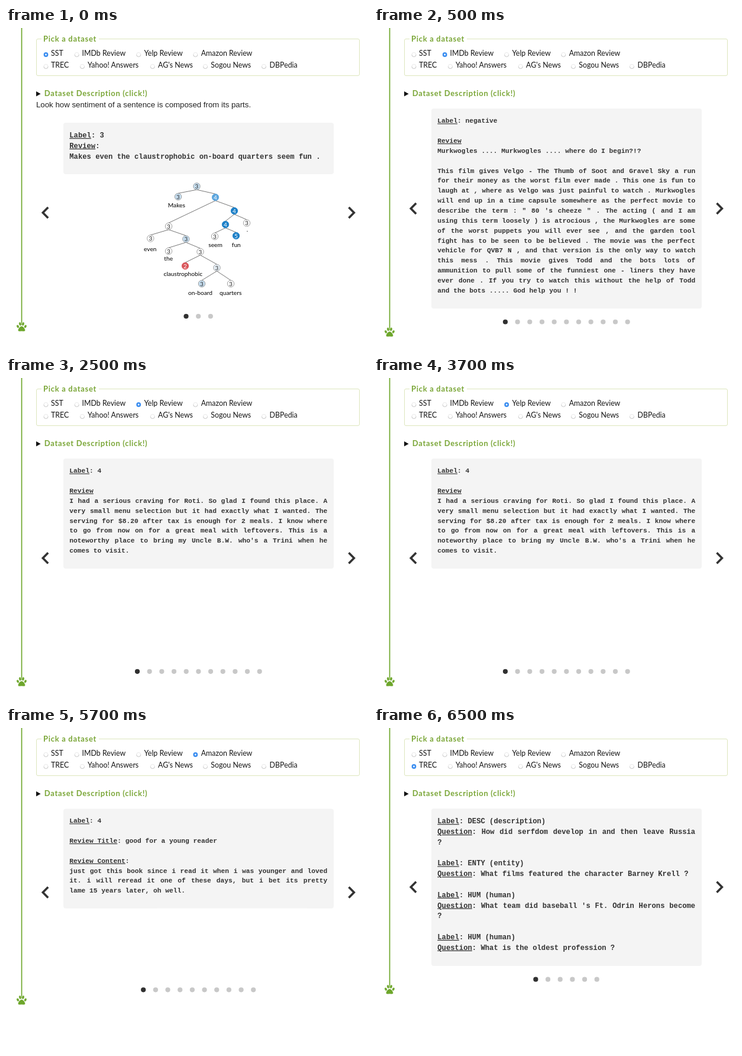
Recreate the animation shown at these times as an HTML page. Size 612 px wide and 544 px high, loop 8000 ms.

```html
<!DOCTYPE html>
<html lang="en">
<head>
<meta charset="utf-8">
<title>Dataset picker</title>
<style>
  html, body { margin: 0; width: 100%; height: 100%; overflow: hidden; background: #fff; }
  svg { display: block; width: 612px; height: 544px; }
  .label { font: 12.4px Lato, sans-serif; fill: #161616; }
  .head { font: bold 13px Lato, sans-serif; letter-spacing: .7px; fill: #7aa637; }
  .intro { font: 13.25px "Liberation Sans", Arial, sans-serif; fill: #222; }
  .mono { font-family: "Liberation Mono", Courier, monospace; font-weight: bold; fill: #333; }
  .mono .u { text-decoration: underline 1px; text-underline-offset: 2px; }
  .leaf { font: 10.2px Lato, sans-serif; fill: #000; text-anchor: middle; }
  .score { font: 10px Lato, sans-serif; text-anchor: middle; }
</style>
</head>
<body>
<svg id="stage" viewBox="0 0 612 544" xmlns="http://www.w3.org/2000/svg"></svg>
<script>
const LOOP = 8000;
const LEFT = 107.3, WIDTH = 436.3;
const GREEN = '#6da62b';

// text, radio x, label x, row
const options = [
  ['SST', 67.5, 76, 0], ['IMDb Review', 119.7, 128.5, 0],
  ['Yelp Review', 224.2, 233.5, 0], ['Amazon Review', 320.3, 329.7, 0],
  ['TREC', 67.5, 76, 1], ['Yahoo! Answers', 129, 138, 1],
  ["AG's News", 247.8, 257, 1], ['Sogou News', 337, 346.3, 1],
  ['DBPedia', 436, 445.6, 1]
];

const small = { size: 11.26, step: 16.86, base: 160.3 };
const large = { size: 12.2, step: 17.8, base: 161.2 };

const scenes = [
  { at: 0, pick: 0, top: 160, bottom: 247, arrow: 312, dotY: 487, dotX: 304.5, dots: 3, paw: 505,
    type: { ...large, base: 185 }, tree: true,
    text: `_Label_: 3
_Review_:
Makes even the claustrophobic on-board quarters seem fun .` },
  { at: 500, pick: 1, top: 136, bottom: 474, arrow: 305, dotY: 496.5, dotX: 222, dots: 11, paw: 514,
    type: small,
    text: `_Label_: negative

_Review_
Murkwogles .... Murkwogles .... where do I begin?!?

This film gives Velgo - The Thumb of Soot and Gravel Sky a run for their money as the worst film ever made . This one is fun to laugh at , where as Velgo was just painful to watch . Murkwogles will end up in a time capsule somewhere as the perfect movie to describe the term : " 80 's cheeze " . The acting ( and I am using this term loosely ) is atrocious , the Murkwogles are some of the worst puppets you will ever see , and the garden tool fight has to be seen to be believed . The movie was the perfect vehicle for QVB7 N , and that version is the only way to watch this mess . This movie gives Todd and the bots lots of ammunition to pull some of the funniest one - liners they have ever done . If you try to watch this without the help of Todd and the bots ..... God help you ! !` },
  { at: 2500, pick: 2, top: 136, bottom: 322, arrow: 304.3, dotY: 495.8, dotX: 222, dots: 11, paw: 513.3,
    type: small,
    text: `_Label_: 4

_Review_
I had a serious craving for Roti. So glad I found this place. A very small menu selection but it had exactly what I wanted. The serving for $8.20 after tax is enough for 2 meals. I know where to go from now on for a great meal with leftovers. This is a noteworthy place to bring my Uncle B.W. who's a Trini when he comes to visit.` },
  { at: 4500, pick: 3, top: 136.5, bottom: 304.7, arrow: 277.7, dotY: 442.3, dotX: 232.2, dots: 10, paw: 460,
    type: small,
    text: `_Label_: 4

_Review Title_: good for a young reader

_Review Content_:
just got this book since i read it when i was younger and loved it. i will reread it one of these days, but i bet its pretty lame 15 years later, oh well.` },
  { at: 6500, pick: 4, top: 136, bottom: 402, arrow: 268.7, dotY: 424.7, dotX: 273.4, dots: 6, paw: 442,
    type: large,
    text: `_Label_: DESC (description)
_Question_: How did serfdom develop in and then leave Russia ?

_Label_: ENTY (entity)
_Question_: What films featured the character Barney Krell ?

_Label_: HUM (human)
_Question_: What team did baseball 's Ft. Odrin Herons become ?

_Label_: HUM (human)
_Question_: What is the oldest profession ?` }
];

// x, y, score, tone, parent, leaf text, leaf x, leaf y
const nodes = [
  [322.5, 267.5, 3, 'pale', -1],
  [291, 285, 3, 'pale', 0, 'Makes', 288.3, 303],
  [354, 286, 4, 'mid', 0],
  [386, 309, 4, 'deep', 2],
  [371, 332, 4, 'deep', 3],
  [407, 329.5, 3, 'none', 3, '.', 408, 343.5],
  [275, 335, 3, 'none', 2],
  [244.3, 355.5, 3, 'none', 6, 'even', 243.8, 376.5],
  [304.3, 356.5, 3, 'pale', 6],
  [353, 352, 3, 'none', 4, 'seem', 354, 370],
  [389, 351, 5, 'deep', 4, 'fun', 389.3, 369.5],
  [275, 377, 3, 'none', 8, 'the', 274.7, 393],
  [328.5, 378, 3, 'none', 8],
  [303, 402, 2, 'red', 12, 'claustrophobic', 299.3, 419],
  [356.5, 405, 3, 'faint', 12],
  [331, 432, 3, 'pale', 14, 'on-board', 328.5, 451],
  [380, 432, 3, 'none', 14, 'quarters', 379.7, 451]
];
const tones = { none: '#fff', faint: '#eaf3fb', pale: '#c9e1f3', mid: '#5ba5dd', deep: '#1c7fc7', red: '#d9555a' };
const RADIUS = 5.7;

const text = (cls, x, y, s) => `<text class="${cls}" x="${x}" y="${y}">${s}</text>`;
const circle = (x, y, r, attrs) => `<circle cx="${x}" cy="${y}" r="${r}" ${attrs}/>`;

function radio(x, y, on) {
  if (on) return circle(x, y, 3.9, 'fill="#3a8df0"') + circle(x, y, 1.4, 'fill="#fff"');
  return circle(x, y, 3.6, 'fill="#fff" stroke="#e2e2e2" stroke-width=".8"') +
    `<path d="M${x - 3.6} ${y}a3.6 3.6 0 0 0 7.2 0" fill="none" stroke="#c6c6c6" stroke-width=".8"/>`;
}

function picker(pick) {
  const rows = options.map(([name, rx, x, row], i) =>
    radio(rx, 45 + row * 20, i === pick) + text('label', x, 47 + row * 19.6, name));
  return `<path d="M60 18.5H54a2.5 2.5 0 0 0-2.5 2.5V78a2.5 2.5 0 0 0 2.5 2.5H595a2.5 2.5 0 0 0 2.5-2.5V21a2.5 2.5 0 0 0-2.5-2.5H157"
    fill="none" stroke="#dde6bd"/>` + text('head', 63, 22.5, 'Pick a dataset') + rows.join('');
}

function wrap(par, max) {
  const lines = [''];
  for (const word of par.split(' ')) {
    const last = lines[lines.length - 1];
    const next = last ? last + ' ' + word : word;
    if (next.replace(/_/g, '').length > max) lines.push(word);
    else lines[lines.length - 1] = next;
  }
  return lines;
}

// Wrapped, justified monospace copy
function copy(source, { size, step, base }) {
  const cell = size * 0.6001;
  let y = base, out = '';
  for (const par of source.split('\n')) {
    const lines = wrap(par, Math.floor(WIDTH / cell));
    lines.forEach((line, i) => {
      const plain = line.replace(/_/g, '');
      const gaps = plain.split(' ').length - 1;
      const extra = i < lines.length - 1 && gaps ? (WIDTH - plain.length * cell) / gaps : 0;
      const marked = line.replace(/_(.+?)_/g, '<tspan class="u">$1</tspan>');
      out += `<text class="mono" x="${LEFT}" y="${y}" font-size="${size}" word-spacing="${extra}">${marked}</text>`;
      y += step;
    });
  }
  return out;
}

// Links run from the foot of a parent to the head of its child
function tree() {
  const links = nodes.filter(n => n[4] >= 0).map(([x, y, , , p]) =>
    `<path d="M${x} ${y - RADIUS}L${nodes[p][0]} ${nodes[p][1] + RADIUS}" stroke="#666" stroke-width=".9"/>`);
  const marks = nodes.map(([x, y, score, tone, , leaf, lx, ly]) => {
    const dark = /mid|deep|red/.test(tone);
    return circle(x, y, RADIUS, `fill="${tones[tone]}" stroke="${dark ? tones[tone] : '#888'}" stroke-width=".8"`) +
      `<text class="score" x="${x}" y="${y + 3.5}" fill="${dark ? '#fff' : '#222'}">${score}</text>` +
      (leaf ? text('leaf', lx, ly, leaf) : '');
  });
  return links.join('') + marks.join('');
}

function rail(y) {
  const toe = (x, dy, rx, ry, turn) =>
    `<ellipse rx="${rx}" ry="${ry}" transform="translate(${x} ${dy}) rotate(${turn})"/>`;
  return `<path d="M26.5 0V${y - 3}" stroke="${GREEN}" stroke-width="1.7"/>
    <g transform="translate(26.4 ${y})" fill="${GREEN}" stroke="#fff" stroke-width=".4">
    ${toe(-6.4, -.8, 2, 2.8, -25)}${toe(6.4, -.8, 2, 2.8, 25)}
    ${toe(-2.6, -5, 2, 3.1, -10)}${toe(2.6, -5, 2, 3.1, 10)}
    <path d="M0-1.3C2.6-1.3 6 3 6 5.6 6 8.6 2.6 7.2 0 7.2S-6 8.6-6 5.6C-6 3-2.6-1.3 0-1.3Z"/></g>`;
}

function carousel(s) {
  const dots = Array.from({ length: s.dots }, (_, i) =>
    circle(s.dotX + i * 20.67, s.dotY, 4.1, `fill="${i ? '#c8c8c8' : '#303030'}"`));
  return `<rect x="97" y="${s.top}" width="457" height="${s.bottom - s.top}" rx="4" fill="#f4f4f4"/>
    <path transform="translate(0 ${s.arrow})" d="M71.2-9L62.3 0 71.2 9M579.5-9L588.4 0 579.5 9"
      fill="none" stroke="#333" stroke-width="3.6"/>` + dots.join('');
}

function draw(s) {
  return rail(s.paw) + picker(s.pick) +
    '<path d="M51 107L58.6 111.2 51 115.4Z" fill="#111"/>' +
    text('head', 64.8, 114.8, 'Dataset Description (click!)') +
    (s.tree ? text('intro', 51, 134, 'Look how sentiment of a sentence is composed from its parts.') : '') +
    carousel(s) + copy(s.text, s.type) + (s.tree ? tree() : '');
}

const stage = document.getElementById('stage');
let shown = null;

function update() {
  const t = performance.now() % LOOP;
  const scene = scenes.filter(s => s.at <= t).pop();
  if (scene !== shown) {
    stage.innerHTML = draw(scene);
    shown = scene;
  }
  requestAnimationFrame(update);
}
update();
</script>
</body>
</html>
```
